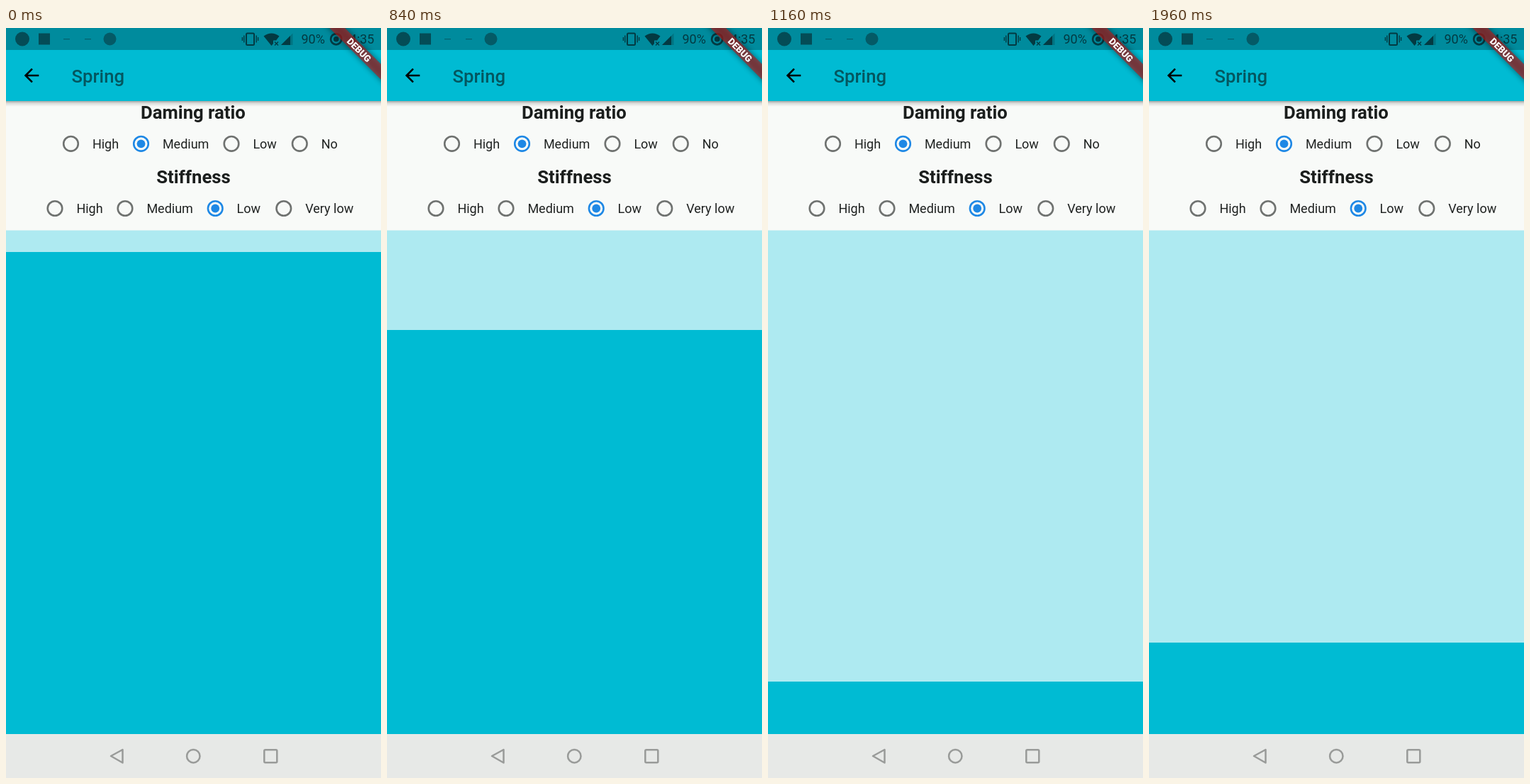
An HTML page for the animation above (3080 ms loop, 529x1058 px).

```html
<!DOCTYPE html>
<html lang="en">
<head>
<meta charset="utf-8">
<title>Spring</title>
<style>
  html, body { margin: 0; width: 100%; height: 100%; overflow: hidden; background: #00bbd3; }
  svg { display: block; width: 100%; height: 100%; font-family: Roboto, sans-serif; }
  .heading { font-size: 25.7px; font-weight: 700; fill: #1b1e1d; text-anchor: middle; }
  .label { font-size: 18px; fill: #1f2221; }
  .title { font-size: 25.7px; font-weight: 500; fill: #04565f; }
  .status { font-size: 18px; fill: #033a42; }
  .debug { font-size: 13.1px; font-weight: 900; fill: #fff; text-anchor: middle; }
  .ring { fill: none; stroke: #6f7270; stroke-width: 2.57; }
  .on .ring { stroke: #1e88e5; }
  .dot { fill: #1e88e5; }
  .nav { fill: none; stroke: #999b99; stroke-width: 2.5; stroke-linejoin: round; }
</style>
</head>
<body>
<svg viewBox="0 0 529 1058" preserveAspectRatio="none">
  <defs>
    <linearGradient id="shade" x1="0" y1="0" x2="0" y2="1">
      <stop offset="0" stop-color="#000" stop-opacity=".34"/>
      <stop offset=".4" stop-color="#000" stop-opacity=".12"/>
      <stop offset="1" stop-color="#000" stop-opacity="0"/>
    </linearGradient>
    <filter id="blur" x="-20%" y="-150%" width="140%" height="400%">
      <feGaussianBlur stdDeviation="4.2"/>
    </filter>
  </defs>

  <rect width="529" height="1058" fill="#00bbd3"/>
  <rect id="level" y="285" width="529" height="31" fill="#aeeaf1"/>
  <rect y="102" width="529" height="183.5" fill="#f8faf8"/>
  <rect y="103" width="529" height="8" fill="url(#shade)"/>
  <rect y="30" width="529" height="73" fill="#00bbd3"/>
  <rect width="529" height="31" fill="#008b9d"/>

  <!-- status bar -->
  <g fill="#033a42">
    <circle cx="23" cy="15.5" r="10" fill="#044c56"/>
    <rect x="46" y="7.5" width="16" height="16" fill="#044c56"/>
    <path d="M81 15.7h9M111 15.7h9" stroke="#05626e" stroke-width="1.3"/>
    <circle cx="146.5" cy="15.5" r="9" fill="#045a66"/>
    <rect x="339" y="7.5" width="11" height="16.5" rx="1.5" fill="none" stroke="#033a42" stroke-width="2"/>
    <path d="M335.8 10.5v10M353.2 10.5v10M333.4 13v5M355.6 13v5" stroke="#033a42" stroke-width="1.4"/>
    <path d="M363.5 11.5Q374.5 3.5 385.5 11.5L381 17.5H377V22L374.5 25Z"/>
    <path d="M379 19.5l5 5m0-5l-5 5" stroke="#033a42" stroke-width="1.4"/>
    <path d="M388 24L404.500 7.500V24Z" opacity=".3"/>
    <path d="M388 24L401 11V24Z"/>
    <circle cx="465.700" cy="15.700" r="7.600" fill="none" stroke="#033a42" stroke-width="2.700"/>
    <circle cx="465.700" cy="15.700" r="3.800"/>
  </g>
  <text class="status" x="416.500" y="22.300">90%</text>
  <text class="status" x="519.500" y="22.300" text-anchor="end">4:35</text>

  <!-- app bar -->
  <path transform="translate(20.600 51.600) scale(1.286)" d="M20 11H7.830l5.590-5.590L12 4l-8 8 8 8 1.410-1.410L7.830 13H20z"/>
  <text class="title" x="92.600" y="76.700">Spring</text>

  <!-- options -->
  <text class="heading" x="264" y="127.500">Daming ratio</text>
  <text class="heading" x="264.500" y="218.600">Stiffness</text>
  <g id="options"></g>

  <!-- corner ribbon -->
  <g transform="translate(529 0) rotate(45)">
    <rect x="-70" y="36" width="140" height="15.400" fill="#000" opacity=".5" filter="url(#blur)"/>
    <rect x="-70" y="36" width="140" height="15.400" fill="#b71c1c" fill-opacity=".627"/>
    <text class="debug" y="48.400">DEBUG</text>
  </g>

  <!-- navigation bar -->
  <rect y="996" width="529" height="62" fill="#e7e9e7"/>
  <path class="nav" d="M148 1027L164.500 1018V1036.500Z"/>
  <circle class="nav" cx="264.300" cy="1027.200" r="9.200"/>
  <rect class="nav" x="364.300" y="1018.300" width="18" height="18" rx="1.500"/>
</svg>

<script>
  const LOOP = 3080, STEP = 40, LAST = 1960;
  const level = document.getElementById('level');

  const option = (x, y, text, on) => `
    <g class="${on ? 'on' : ''}">
      <circle class="ring" cx="${x}" cy="${y}" r="10.3"/>
      ${on ? `<circle class="dot" cx="${x}" cy="${y}" r="5.9"/>` : ''}
      <text class="label" x="${x + 30.4}" y="${y + 6.7}">${text}</text>
    </g>`;

  const row = (y, chosen, items) =>
    items.map(([x, text]) => option(x, y, text, text === chosen)).join('');

  document.getElementById('options').innerHTML =
    row(163.3, 'Medium', [[91.5, 'High'], [190.5, 'Medium'], [318, 'Low'], [414.3, 'No']]) +
    row(254.5, 'Low', [[69, 'High'], [168, 'Medium'], [295.2, 'Low'], [391.8, 'Very low']]);

  // Finger drag: [ms, y]
  const drag = [[0, 316], [120, 336], [240, 352], [320, 358], [420, 359.5],
                [560, 356], [680, 361], [760, 374], [800, 394], [840, 426], [880, 474]];

  function dragY(t) {
    const i = drag.findIndex(p => p[0] > t);
    const [t0, y0] = drag[i - 1], [t1, y1] = drag[i];
    return y0 + (y1 - y0) * (t - t0) / (t1 - t0);
  }

  // Underdamped spring: stiffness 200, damping ratio 0.5
  const REST = 867.4, PULL = 420.5, START = 852.5;
  const omega = Math.sqrt(200), zeta = 0.5;
  const damped = omega * Math.sqrt(1 - zeta * zeta);

  function springY(t) {
    const s = (t - START) / 1000;
    const wave = Math.cos(damped * s) + zeta * omega / damped * Math.sin(damped * s);
    return REST - PULL * Math.exp(-zeta * omega * s) * wave;
  }

  const begin = performance.now();

  function draw(now) {
    const time = Math.max(0, now - begin) % LOOP;
    const t = Math.min(LAST, Math.floor(time / STEP) * STEP);
    const y = t < 880 ? dragY(t) : springY(t);
    level.setAttribute('height', Math.round(y) - 285);
    requestAnimationFrame(draw);
  }
  draw(begin);
</script>
</body>
</html>
```
